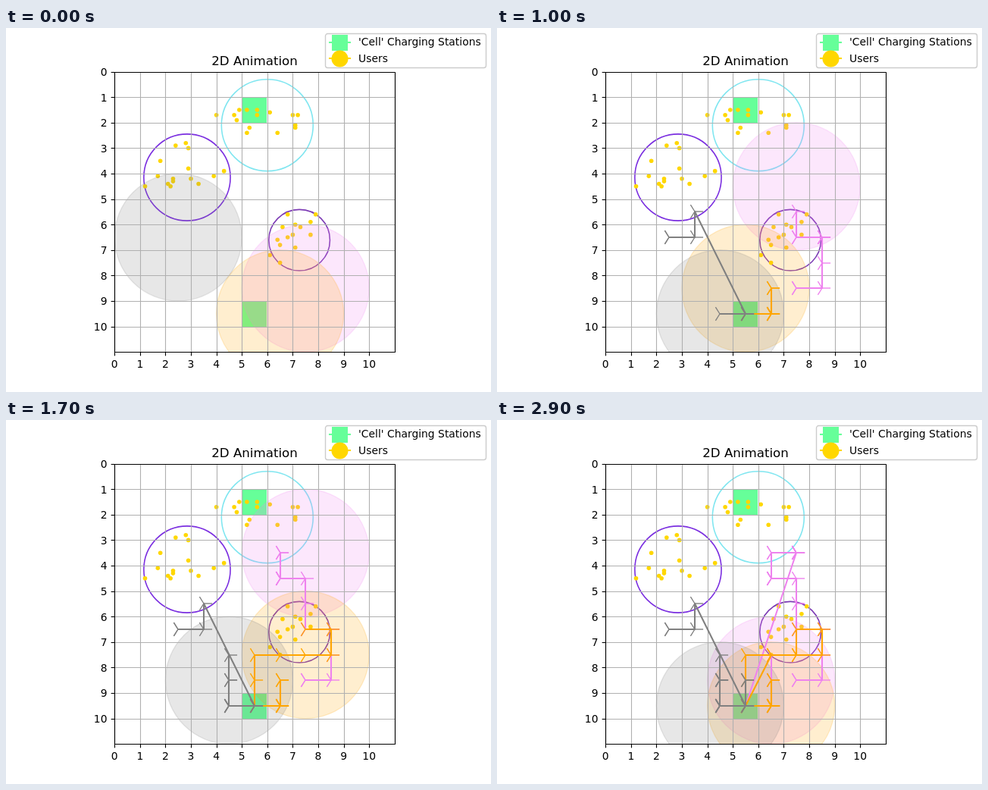
An HTML page with a canvas for the animation above (3 s loop, 640 by 480 pixels).

```html
<!DOCTYPE html>
<html lang="en">
<head>
<meta charset="utf-8">
<title>2D Animation</title>
<style>
  html, body { margin: 0; width: 100%; height: 100%; overflow: hidden; background: #fff; }
  canvas { display: block; }
</style>
</head>
<body>
<canvas id="stage" width="640" height="480"></canvas>
<script>
const ctx = document.getElementById('stage').getContext('2d');
const STEP_MS = 100, STEPS = 30;
const LEFT = 143.2, TOP = 57.6, UNIT = 33.6, SIZE = 11 * UNIT;
const GREEN = '#66ff99', GOLD = '#ffd700';
const px = x => LEFT + x * UNIT;
const py = y => TOP + y * UNIT;
const crisp = v => Math.round(v) + 0.5;

const stations = [[5, 1], [5, 9]];
const areas = [
  { x: 6, y: 2.1, r: 1.8, color: '#80e6f0' },
  { x: 2.85, y: 4.15, r: 1.7, color: '#7b2fe0' },
  { x: 7.26, y: 6.61, r: 1.2, color: '#7d3cb5' }
];
const users = [
  [4, 1.7], [4.7, 1.7], [4.8, 1.9], [4.9, 1.5], [5.2, 1.5], [5.2, 2.4], [5.3, 2.2], [5.6, 1.5],
  [5.6, 1.7], [6.1, 1.6], [6.4, 2.4], [7, 1.7], [7.2, 1.7], [7.1, 2.1], [7.1, 2.2],
  [2.8, 2.8], [2.4, 2.9], [2.9, 3], [1.8, 3.5], [2.9, 3.8], [4.3, 3.9], [1.7, 4.1], [3.9, 4.1],
  [2.3, 4.2], [2.3, 4.3], [3, 4.2], [2.1, 4.4], [2.2, 4.5], [3.3, 4.4], [1.2, 4.5],
  [6.8, 5.6], [7.9, 5.6], [7.7, 5.9], [7.1, 6], [6.6, 6.1], [7.3, 6.1], [7, 6.4], [7.7, 6.4],
  [6.8, 6.5], [6.4, 6.6], [6.5, 6.8], [7.1, 6.9], [6.1, 7.2], [6.5, 7.5]
];

// One letter per step: a unit move, "." to wait, "H" to jump to the lower station.
const MOVES = { R: [1, 0], L: [-1, 0], U: [0, -1], D: [0, 1], '.': [0, 0] };
function route(x, y, steps) {
  const points = [[x, y]];
  for (const s of steps) {
    [x, y] = s === 'H' ? [5.5, 9.5] : [x + MOVES[s][0], y + MOVES[s][1]];
    points.push([x, y]);
  }
  return points;
}
const drones = [
  { color: '#ee82ee', path: route(7.5, 8.5, '.RUU..L.UUL...U.R.....H..RUUD') },
  { color: '#ffa500', path: route(6.5, 9.5, '...U.DL..UURRRULDLH......R...') },
  { color: '#808080', path: route(2.5, 6.5, '.RUH....L..UUDD.U..D...RU.D.L') }
];

function line(points, color, width) {
  ctx.strokeStyle = color;
  ctx.lineWidth = width;
  ctx.beginPath();
  points.forEach(([x, y], i) => i ? ctx.lineTo(x, y) : ctx.moveTo(x, y));
  ctx.stroke();
}

function disc(x, y, r, fill, stroke, width) {
  ctx.beginPath();
  ctx.arc(x, y, r, 0, Math.PI * 2);
  if (fill) { ctx.fillStyle = fill; ctx.fill(); }
  if (stroke) { ctx.strokeStyle = stroke; ctx.lineWidth = width; ctx.stroke(); }
}

function text(str, x, y, align, size = 13.89) {
  ctx.font = `${size}px "DejaVu Sans", sans-serif`;
  ctx.textAlign = align;
  ctx.fillStyle = '#000';
  ctx.fillText(str, x, y);
}

function drawScene(step) {
  ctx.save();
  ctx.beginPath();
  ctx.rect(LEFT, TOP, SIZE, SIZE);
  ctx.clip();
  ctx.fillStyle = GREEN;
  for (const [x, y] of stations) ctx.fillRect(Math.round(px(x)), Math.round(py(y)), 33, 34);
  for (const a of areas) disc(px(a.x), py(a.y), a.r * UNIT, null, a.color, 1.6);
  for (const [x, y] of users) disc(px(x), py(y), 2.8, GOLD);
  ctx.globalAlpha = 0.19;
  for (const { color, path } of drones) {
    const [x, y] = path[step];
    disc(px(x), py(y), 2.5 * UNIT, color, color, 1.39);
  }
  ctx.restore();
}

function drawAxes() {
  const right = crisp(LEFT + SIZE), bottom = crisp(TOP + SIZE);
  const left = crisp(LEFT), top = crisp(TOP);
  for (let i = 0; i < 11; i++) {
    const x = crisp(px(i)), y = crisp(py(i));
    line([[x, top], [x, bottom]], '#b0b0b0', 1.11);
    line([[left, y], [right, y]], '#b0b0b0', 1.11);
    line([[x, bottom], [x, bottom + 4.86]], '#000', 1.11);
    line([[left, y], [left - 4.86, y]], '#000', 1.11);
    text(i, px(i), 448, 'center');
    text(i, 133.5, Math.round(py(i) + 5.3), 'right');
  }
}

function drawFrame() {
  ctx.strokeStyle = '#000';
  ctx.lineWidth = 1.11;
  ctx.strokeRect(crisp(LEFT), crisp(TOP), 370, 369);
}

function drawTrail({ color, path }, step) {
  const points = path.slice(0, step).map(([x, y]) => [Math.round(px(x)), Math.round(py(y))]);
  ctx.lineJoin = 'round';
  line(points, color, 2.08);
  for (const [x, y] of points) {
    line([[x, y], [x + 11.1, y]], color, 1.39);
    line([[x - 5.6, y - 8.9], [x, y], [x - 5.6, y + 8.9]], color, 1.39);
  }
}

function drawLegend() {
  ctx.beginPath();
  ctx.roundRect(421.5, 7.5, 212, 45, 3);
  ctx.fillStyle = 'rgba(255,255,255,0.8)';
  ctx.fill();
  ctx.strokeStyle = '#ccc';
  ctx.lineWidth = 1.39;
  ctx.stroke();
  line([[426, 19], [455, 19]], GREEN, 2.08);
  ctx.fillStyle = GREEN;
  ctx.fillRect(430, 9, 21, 21);
  line([[426, 40], [455, 40]], GOLD, 2.08);
  disc(440.5, 40.5, 11, GOLD);
  text("'Cell' Charging Stations", 465, 23, 'left');
  text('Users', 465, 45, 'left');
}

function render(now) {
  const step = Math.floor(now / STEP_MS) % STEPS;
  ctx.fillStyle = '#fff';
  ctx.fillRect(0, 0, 640, 480);
  drawScene(step);
  drawAxes();
  for (const drone of drones) drawTrail(drone, step);
  drawFrame();
  text('2D Animation', 328, 49, 'center', 16.67);
  drawLegend();
}

const start = performance.now();
function tick() {
  render(performance.now() - start);
  requestAnimationFrame(tick);
}
tick();
</script>
</body>
</html>
```
